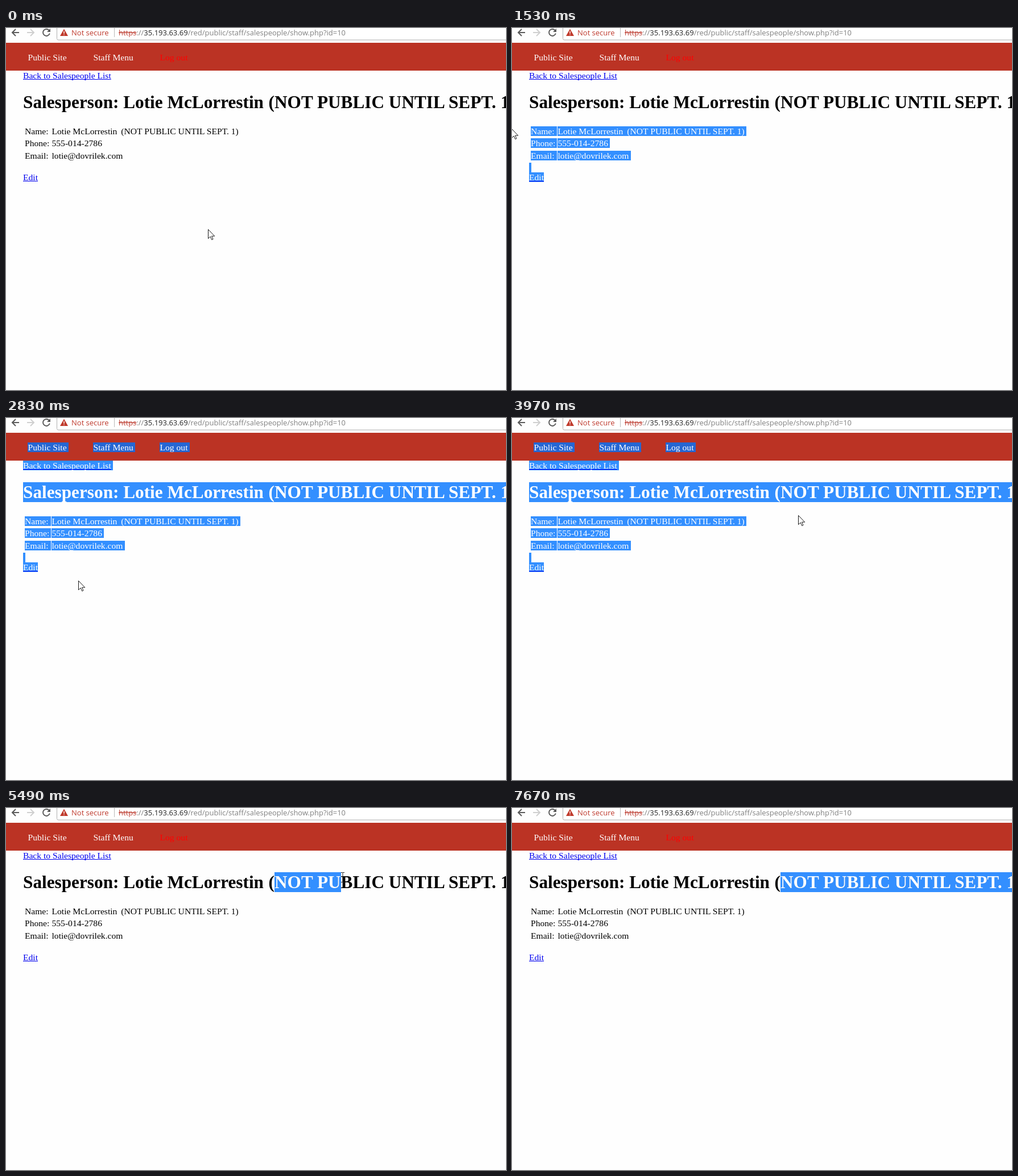
Write an HTML page that moves like this. It is 879x637 px and loops after 8000 ms.

```html
<!DOCTYPE html>
<html lang="en">
<head>
<meta charset="utf-8">
<title>Salesperson page</title>
<style>
  html, body { margin: 0; width: 100%; height: 100%; overflow: hidden; background: #fefefe; }
  svg { display: block; width: 879px; height: 637px; overflow: hidden; }
  text { font: 15.625px "Liberation Serif", "Times New Roman", serif; white-space: pre; }
  .title { font-size: 31.25px; font-weight: bold; }
  .bar text { font: 13px "Open Sans", "Noto Sans", sans-serif; }
  .icon { fill: none; stroke: #5a5a5a; stroke-width: 2; }
  .mark { fill: rgba(0, 116, 255, .8); visibility: hidden; }
  .marked .mark { visibility: visible; }
  .marked text { fill: #fff; }
</style>
</head>
<body>
<svg viewBox="0 0 879 637">
  <defs>
    <clipPath id="range"><rect id="rangeClip" x="472" y="113" width="0" height="35"/></clipPath>
  </defs>

  <g class="bar">
    <path d="M89.5-5V18.5q0 2.5 2.5 2.5H890V-5z" fill="#fff" stroke="#b0b0b0"/>
    <path class="icon" d="M23 8H11M17 2L11 8l6 6"/>
    <path class="icon" d="M37 8H49M43 2l6 6-6 6" style="stroke:#cfcfcf"/>
    <path class="icon" d="M75.6 4A6 6 0 1 0 76.8 9.5"/>
    <path d="M78 1V7H72z" fill="#5a5a5a"/>
    <path d="M102 1.5L109 14H95z" fill="#c0392b"/>
    <path d="M102 5.5V10M102 11.2V12.6" stroke="#fff" stroke-width="1.4"/>
    <text x="115" y="13" fill="#bf3a2e">Not secure</text>
    <path d="M190.5 0V16" stroke="#b8b8b8"/>
    <text x="198" y="13" fill="#808080"><tspan fill="#c0453a" text-decoration="line-through">https</tspan>://<tspan fill="#222">35.193.63.69</tspan>/red/public/staff/salespeople/show.php?id=10</text>
  </g>
  <rect y="26" width="879" height="49" fill="#bb3324"/>

  <g id="nav"></g>
  <g id="back"></g>
  <g id="title"></g>
  <g id="table"></g>
  <g clip-path="url(#range)"><g id="titleRange" class="marked"></g></g>

  <path id="arrow" d="M.5 .5V16.5L4.2 13L6.7 18.6L9 17.6L6.5 12.2H11.7z" fill="#fff" stroke="#1a1a1a"/>
  <path id="beam" d="M-3-8.5H-.5L0-8L.5-8.5H3M0-8V8M-3 8.5H-.5L0 8L.5 8.5H3" fill="none" stroke="#222"/>
</svg>
<script>
const LOOP = 8000;
const TICK = 140;
const SVG_NS = 'http://www.w3.org/2000/svg';
const byId = id => document.getElementById(id);

function add(parent, tag, attributes, content = '') {
  const node = document.createElementNS(SVG_NS, tag);
  for (const name in attributes) node.setAttribute(name, attributes[name]);
  node.textContent = content;
  return parent.appendChild(node);
}

// Adds a line of text with its selection box; the box also covers the line break.
function addLine(group, x, y, content, { fill = '#000', note, noteX, link, tail = 3.5, right } = {}) {
  const big = group.startsWith('title');
  const parent = byId(group);
  const mark = add(parent, 'rect', { class: 'mark' });
  const text = add(parent, 'text', { x, y, fill: link ? '#00e' : fill, class: big ? 'title' : '' }, content);
  if (note) add(text, 'tspan', { x: noteX }, note);

  const count = text.getNumberOfChars();
  const end = count ? text.getEndPositionOfChar(count - 1).x : x;
  const left = Math.floor(x);
  const size = { x: left, y: Math.round(y) - (big ? 28 : 14), height: big ? 35 : 17 };
  size.width = (right || Math.round(end + tail)) - left;
  for (const name in size) mark.setAttribute(name, size[name]);
  if (link) add(parent, 'rect', { x, y: Math.round(y) + 1, width: end - x, height: 1, fill: '#00e' });
  return text;
}

const note = '(NOT PUBLIC UNTIL SEPT. 1)';
const person = 'Lotie McLorrestin';
const addTitle = group => addLine(group, 30, 141.4, 'Salesperson: ' + person, { note, noteX: 461.6 });

addLine('nav', 38.5, 56.7, 'Public Site', { fill: '#fff' });
addLine('nav', 153.5, 56.7, 'Staff Menu', { fill: '#fff' });
addLine('nav', 270.5, 56.7, 'Log out', { fill: '#f00' });
addLine('back', 30, 88.7, 'Back to Salespeople List', { link: true });
addTitle('title');
const rangeText = addTitle('titleRange');
[
  ['Name:', person, { note, noteX: 202.3 }],
  ['Phone:', '555-014-2786'],
  ['Email:', 'lotie@dovrilek.com'],
].forEach(([label, value, options], row) => {
  const y = 186.8 + 21.5 * row;
  addLine('table', 33, y, label, { right: 79 });
  addLine('table', 80.5, y, value, options);
});
addLine('table', 30, 251, '');
addLine('table', 30, 267.8, 'Edit', { link: true, tail: 0 });

// Pointer strokes: each bends from the previous end past `via` to `to`.
const strokes = [
  { start: 970, end: 1250, via: [100, 250], to: [12, 261] },
  { start: 1530, end: 1790, via: [-14, 112], to: [0, 103] },
  { start: 2100, end: 2830, via: [-15, -60], to: [127, 286] },
  { start: 3130, end: 4100, via: [628, 138], to: [475, 178] },
  { start: 4250, end: 5220, via: [487, 150], to: [471, 118] },
  { start: 5370, end: 5630, via: [653, 124], to: [835, 130] },
  { start: 5910, end: 6330, via: [890, 127], to: [890, 165] },
  { start: 7160, end: 7670, via: [638, 172], to: [890, 175] },
];

const bend = (a, b, c, u) => (1 - u) ** 2 * a + 2 * u * (1 - u) * b + u * u * c;

function pointerAt(t) {
  let place = [355, 354];
  for (const { start, end, via, to } of strokes) {
    if (t < start) break;
    const gaps = Math.round((end - start) / TICK);
    const step = Math.min(gaps, Math.floor((t - start) / (end - start) * gaps + .01));
    const u = (step + 1) / (gaps + 1);
    place = place.map((from, axis) => bend(from, via[axis], to[axis], u));
  }
  return place;
}

const markedFrom = { table: 1530, title: 1660, back: 2100, nav: 2246 };
const CLEARED = 4250, BEAM_FROM = 4800, RANGE_FROM = 5370, BEAM_UNTIL = 7160;

const boundaries = Array.from({ length: rangeText.getNumberOfChars() },
  (_, i) => rangeText.getEndPositionOfChar(i).x);
const snap = x => boundaries.reduce((best, edge) => Math.abs(edge - x) < Math.abs(best - x) ? edge : best);

const show = (id, on) => byId(id).setAttribute('visibility', on ? 'visible' : 'hidden');

function render(t) {
  const [x, y] = pointerAt(t).map(Math.round);
  const overText = t >= BEAM_FROM && t < BEAM_UNTIL;
  for (const id of ['arrow', 'beam']) byId(id).setAttribute('transform', `translate(${x} ${y})`);
  show('arrow', !overText);
  show('beam', overText);

  for (const group in markedFrom) {
    byId(group).classList.toggle('marked', t >= markedFrom[group] && t < CLEARED);
  }
  const [dragX] = pointerAt(Math.min(t, BEAM_UNTIL - 1));
  byId('rangeClip').setAttribute('width', t < RANGE_FROM ? 0 : Math.max(0, Math.round(snap(dragX)) - 472));
}

const begin = performance.now();
function tick() {
  render((performance.now() - begin) % LOOP);
  requestAnimationFrame(tick);
}
tick();
</script>
</body>
</html>
```
